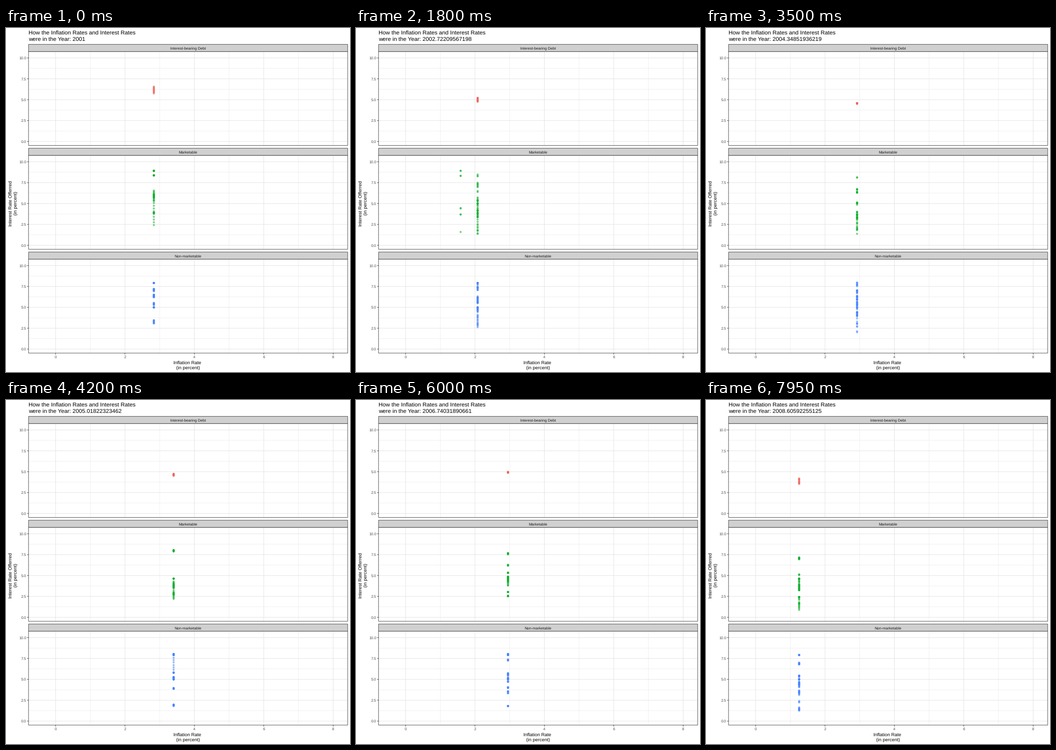
A matplotlib script for the animation above (8 s loop, 748 px wide and 748 px high).

```python
import numpy as np
import matplotlib.pyplot as plt
from matplotlib.animation import FuncAnimation
from matplotlib.patches import Rectangle

SIZE, FRAMES, STEP = 748, 160, 50
YEAR_STEP = 21 / 439
KEYS = [int(k / YEAR_STEP + 0.5) for k in range(9)]
INFLATION = [2.826, 1.586, 2.270, 2.677, 3.393, 3.226, 2.853, 3.839, -0.356]


def path(*knots):
    """Rate that runs straight between (years since 2001, percent) knots."""
    xs, ys = zip(*knots)
    return lambda u: np.interp(u, xs, ys, left=np.nan)


debt = path((0, 6.6), (1, 5.7), (3, 4.55), (4, 4.55), (6, 5.05), (7, 4.85), (8, 3.85), (9, 3.25))

bills = path((0, 6.1), (1, 2.1), (3, 1.0), (4, 2.2), (6, 5.0), (7, 3.4), (8, 0.9), (9, 0.2))
notes = path((0, 6.15), (1, 5.65), (3, 3.75), (4, 3.55), (6, 4.45), (7, 4.6), (9, 2.8))


def bonds(u):
    return 8.42 - 0.021 * u ** 2


def indexed(u):
    return 2.3 + 1.62 / (1 + (u / 3.5) ** 3)


def bank(u):
    return np.where(u < 2, 8.93, np.where(u < 4, np.nan, 4.66))


def market_total(u):
    return 0.75 * notes(u) + 0.25 * bills(u) + 0.45


domestic = path((0, 7.95), (9, 7.95))
foreign = path((0, 7.25), (1, 6.95), (2, 7.45), (4, 7.62), (4.5, 5.86), (9, 5.3))
account = path((0, 6.55), (2, 6.15), (4, 5.3), (7, 5.1), (9, 4.0))
rural = path((0, 5), (9, 5))
savings = path((0, 5.55), (1, 5.25), (3, 4.1), (5, 3.87), (7, 4.2), (9, 2.6))
local = path((0, 3.5), (0.9, 3.05), (1.05, 3.7), (3, 2.2), (5, 1.84), (7.7, 1.84), (9, 0.6))
zero = path((4, 8.06), (7.92, 8.03), (8, 6.2), (9, 6.0))
other_total = path((0, 6.45), (1, 6.2), (3, 5.4), (4, 5.25), (7, 5.0), (9, 3.6))


def market_gaps(k):
    return 8 - k if k > 3 else {1: 3, 3: 5}.get(k, 0)


PANELS = [
    ("Interest-bearing Debt", "#f0645c", [debt], lambda k: 0),
    ("Marketable", "#12b030",
     [bills, notes, bonds, indexed, bank, market_total], market_gaps),
    ("Non-marketable", "#4a85ff",
     [domestic, foreign, account, rural, savings, local, zero, other_total],
     lambda k: 8 - k),
]

LEFT, RIGHT, PITCH = 49, 743, 225.75
TICK_X, TICK_Y = np.arange(0, 9, 2), np.arange(0, 11, 2.5)


def px(x):
    return 107.8 + 75.45 * np.asarray(x)


def py(y, panel):
    return 246.7 + PITCH * panel - 18.16 * np.asarray(y)


def year_rows(series, gaps, k):
    """Month by month rates of one year; missing rows grow denser to its end."""
    u = k + np.arange(12) / 12
    rows = np.column_stack([s(u) for s in series]).ravel()
    rows = rows[~np.isnan(rows)]
    n = gaps(k)
    lost = [int(len(rows) * (1 - (j / (n + 1)) ** 2)) for j in range(1, n + 1)]
    return np.delete(rows, lost)


ROWS = [[year_rows(s, g, k) for k in range(9)] for _, _, s, g in PANELS]


def points(panel, i):
    """Rows paired by order glide to the next year, unpaired ones wait."""
    k = int(np.searchsorted(KEYS, i, side="right")) - 1
    t = (i - KEYS[k]) / (KEYS[k + 1] - KEYS[k])
    a, b = ROWS[panel][k], ROWS[panel][k + 1]
    x, y = np.full(len(a), INFLATION[k]), a.copy()
    n = min(len(a), len(b))
    x[:n] += t * (INFLATION[k + 1] - INFLATION[k])
    y[:n] += t * (b[:n] - a[:n])
    return np.column_stack([px(x), py(y, panel)])


plt.rcParams.update({"font.family": "Liberation Sans", "text.hinting": "none"})
fig = plt.figure(figsize=(SIZE / 100, SIZE / 100), dpi=100, facecolor="white")
ax = fig.add_axes([0, 0, 1, 1])
ax.set_xlim(0, SIZE)
ax.set_ylim(SIZE, 0)
ax.axis("off")


def pt(pixels):
    return pixels * 0.72


def text(x, y, s, size, color="black", ha="center", **kw):
    return ax.text(x, y, s, fontsize=pt(size), color=color, ha=ha, va="baseline", **kw)


def box(top, bottom, fill):
    ax.add_patch(Rectangle((LEFT, top), RIGHT - LEFT, bottom - top, fc=fill,
                           ec="#404040", lw=pt(0.95), zorder=4, snap=False))


def grid(xs, ys, panel, top, bottom, shade, width):
    style = dict(colors=shade, lw=pt(width), zorder=1, snap=False)
    ax.vlines(px(xs), top, bottom, **style)
    ax.hlines(py(ys, panel), LEFT, RIGHT, **style)


tick = dict(colors="#333333", lw=pt(0.95), zorder=3, snap=False)
dots = []
for p, (label, color, _, _) in enumerate(PANELS):
    off = PITCH * p
    top, bottom = 51.2 + off, 255.4 + off
    grid(TICK_X[:-1] + 1, TICK_Y[:-1] + 1.25, p, top, bottom, "#e6e6e6", 0.6)
    grid(TICK_X, TICK_Y, p, top, bottom, "#e3e3e3", 1)
    box(top, bottom, "none")
    box(35.6 + off, top, "#d0d0d0")
    text(396, 47 + off, label, 8.3, "#1a1a1a", zorder=5)
    ax.hlines(py(TICK_Y, p), 46, LEFT, **tick)
    for v in TICK_Y:
        text(44.3, py(v, p) + 3, f"{v:.1f}", 8.24, "#4d4d4d", "right")
    dots.append(ax.scatter([], [], s=pt(4.6) ** 2, c=color, alpha=0.55,
                           linewidths=0, zorder=3))

ax.vlines(px(TICK_X), 707, 710, **tick)
for v in TICK_X:
    text(px(v), 718.2, str(v), 8.24, "#4d4d4d")

text(394.5, 730.7, "Inflation Rate", 10.3)
text(396, 741.7, "(in percent)", 10.3)
for x, s in ((12.8, "Interest Rate Offerred"), (24, "(in percent)")):
    text(x, 381, s, 10.3, rotation=90, rotation_mode="anchor")
text(49, 14.2, "How the Inflation Rates and Interest Rates", 12.35, ha="left")
title = text(49, 28.2, "", 12.35, ha="left")


def draw(i):
    title.set_text(f"were in the Year: {2001 + i * YEAR_STEP:.15g}")
    for p, d in enumerate(dots):
        d.set_offsets(points(p, i))
    return [title, *dots]


anim = FuncAnimation(fig, draw, frames=FRAMES, interval=STEP, repeat=True,
                     repeat_delay=0, blit=False)
plt.show()
```
